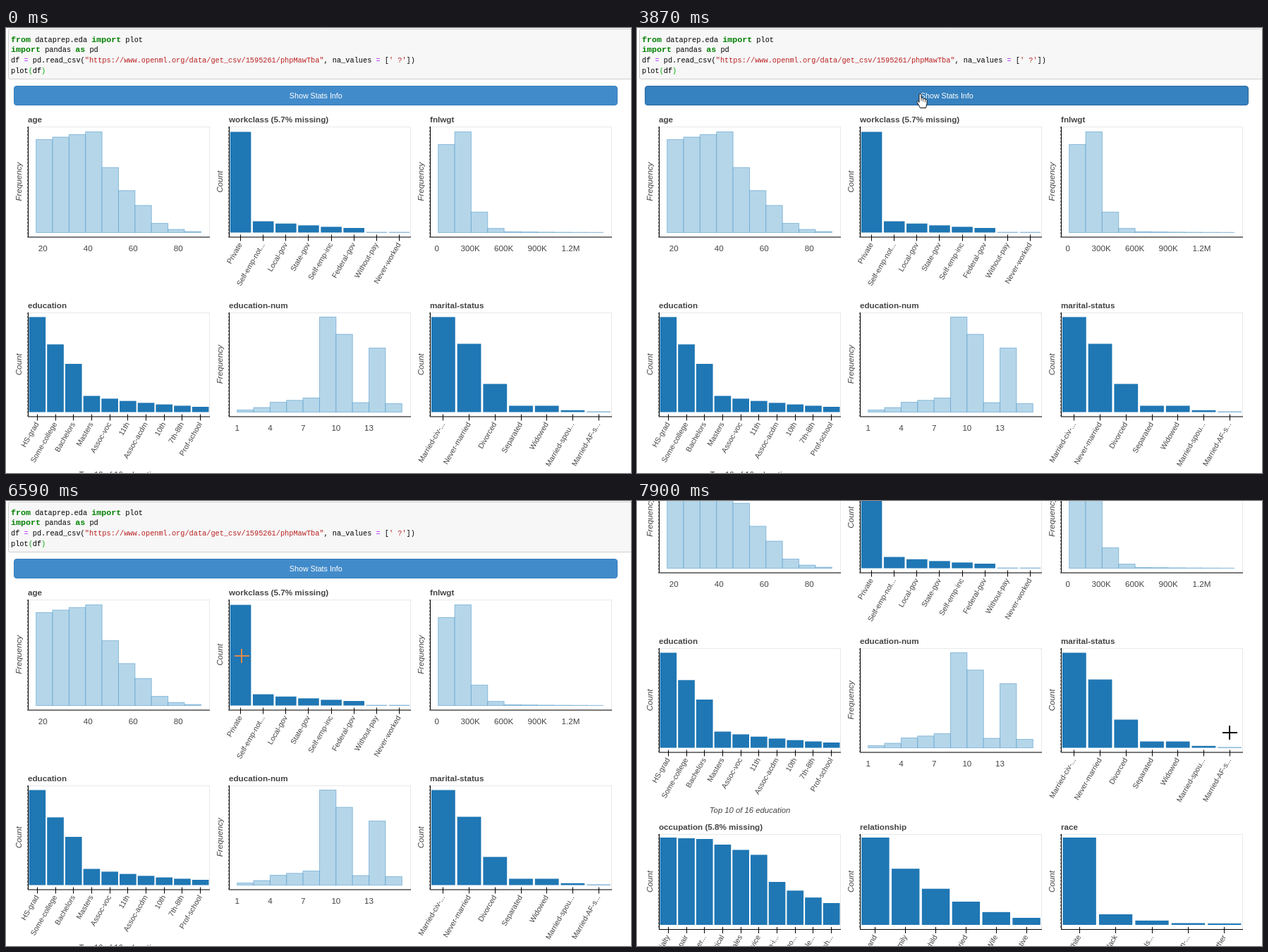
An HTML page with a canvas for the animation above (7990 ms loop, 886x632 px).

```html
<!DOCTYPE html>
<html lang="en">
<head>
<meta charset="utf-8">
<title>Dataset overview</title>
<style>
html, body { margin: 0; width: 100%; height: 100%; overflow: hidden; background: #fff; }
canvas { display: block; }
</style>
</head>
<body>
<canvas id="stage" width="886" height="632"></canvas>
<script>
const ctx = document.getElementById('stage').getContext('2d');
const LOOP = 7990;
const REFRESH = 78;
const SANS = '"Liberation Sans", Arial, sans-serif';
const MONO = '"Liberation Mono", monospace';
const INK = '#444';
const OPEN_AT = 2010, CLOSE_AT = 3870, STATS_HEIGHT = 255;
const PLOT_WIDTH = 257, PLOT_PITCH = 285, ROW_PITCH = 264;
const BINS = 10, BIN_PAD = 11.7, BIN_WIDTH = (PLOT_WIDTH - 2 * BIN_PAD) / BINS;
const PEOPLE = 48842, PEOPLE_PER_PIXEL = 9157 / 143;

// Each glide: first refresh, last refresh, destination
const POINTER_START = [947, 14];
const POINTER = [
  [850, 1550, 440, 95], [1780, 1860, 413, 86], [2010, 2010, 412, 88], [2160, 2240, 401, 89],
  [3030, 3030, 401, 84], [3720, 3720, 396, 84], [3870, 3870, 401, 94], [4180, 4800, 122, 197],
  [5740, 6130, 172, 252], [6280, 6590, 334, 220], [6670, 6980, 811, 335], [7840, 7900, 840, 329]
];
const SCROLL = [[7210, 7700, 127], [7840, 7900, 195]];

// Bar heights are given at a few bars and follow an exponential in between.
const PLOTS = [
  { title: 'age', bars: { 0: 132, 3: 143, 6: 38.5, 9: 1.5 }, range: [17, 90], ticks: [20, 20] },
  { title: 'workclass (5.7% missing)', bars: { 0: 143, 1: 16, 5: 6.5, 6: .7, 7: .7 },
    names: ['Private', 'Self-emp-not...', 'Local-gov', 'State-gov', 'Self-emp-inc', 'Federal-gov',
      'Without-pay', 'Never-worked'] },
  { title: 'fnlwgt', bars: { 0: 125, 1: 143, 4: 1.2, 9: .2 }, range: [12e3, 149e4], ticks: [0, 3e5] },
  { title: 'education', bars: { 0: 135, 2: 68.5, 3: 23, 9: 7.5 }, note: 'Top 10 of 16 education',
    names: ['HS-grad', 'Some-college', 'Bachelors', 'Masters', 'Assoc-voc', '11th', 'Assoc-acdm',
      '10th', '7th-8th', 'Prof-school'] },
  { title: 'education-num', bars: { 0: 3, 2: 14, 4: 20, 5: 135, 6: 110.5, 7: 13.5, 8: 91, 9: 12 },
    range: [1, 16], ticks: [1, 3] },
  { title: 'marital-status', bars: { 0: 135, 1: 97, 2: 40, 3: 9, 4: 9, 6: .8 },
    names: ['Married-civ-...', 'Never-married', 'Divorced', 'Separated', 'Widowed', 'Married-spou...',
      'Married-AF-s...'] },
  { title: 'occupation (5.8% missing)', bars: { 0: 124, 2: 122, 5: 99.5, 6: 61, 9: 31 },
    names: ['Prof-specialty', 'Craft-repair', 'Exec-manager...', 'Adm-clerical', 'Sales', 'Other-service',
      'Machine-op-i...', 'Transport-mo...', 'Handlers-cle...', 'Farming-fish...'] },
  { title: 'relationship', bars: { 0: 124, 3: 33, 5: 10 },
    names: ['Husband', 'Not-in-family', 'Own-child', 'Unmarried', 'Wife', 'Other-relative'] },
  { title: 'race', bars: { 0: 124, 1: 15, 3: 2.5, 4: 2 },
    names: ['White', 'Black', 'Asian-Pac-Is...', 'Amer-Indian-...', 'Other'] }
];
const ROW_DEPTHS = [156.5, 147.5, 135];

PLOTS.forEach((plot, i) => {
  const row = Math.floor(i / 3);
  plot.x = 31 + PLOT_PITCH * (i % 3);
  plot.top = 140 + ROW_PITCH * row;
  plot.axis = plot.top + ROW_DEPTHS[row];
  plot.base = plot.axis - 6;
  plot.heights = fillBetween(plot.bars);
});

const DATASET_STATS = [
  ['Number of Variables', '15'], ['Number of Observations', PEOPLE], ['Missing Cells', '6465'],
  ['Missing Cells (%)', '0.9%'], ['Duplicate Rows', '52'], ['Duplicate Rows (%)', '0.1%'],
  ['Total Size in Memory', '5.6 MB'], ['Average Record Size in Memory', '120.0 B']
];
const TYPE_STATS = [['Categorical', '9'], ['Numerical', '6']];

const KEYWORD = '#008000', OPERATOR = '#a2f', STRING = '#ba2121', BRACKET = '#0a0';
const CODE = [
  [['from', KEYWORD, 1], [' dataprep.eda '], ['import', KEYWORD, 1], [' plot']],
  [['import', KEYWORD, 1], [' pandas '], ['as', KEYWORD, 1], [' pd']],
  [['df '], ['=', OPERATOR], [' pd.read_csv('],
    ['"https://www.openml.org/data/get_csv/1595261/phpMawTba"', STRING],
    [', na_values '], ['=', OPERATOR], [' ['], ["' ?'", STRING], ['])']],
  [['plot'], ['(', BRACKET], ['df'], [')', BRACKET]]
];

function fillBetween(points) {
  const keys = Object.keys(points).map(Number);
  const heights = [points[0]];
  for (let k = 1; k < keys.length; k++) {
    const a = keys[k - 1], b = keys[k];
    for (let i = a + 1; i <= b; i++)
      heights.push(points[a] * (points[b] / points[a]) ** ((i - a) / (b - a)));
  }
  return heights;
}

// Position at time t, moving in refresh steps and slowing towards each destination.
function glide(start, moves, t) {
  let position = start;
  for (const [first, last, ...target] of moves) {
    if (t < first) break;
    const steps = Math.round((last - first) / REFRESH) + 1;
    const gap = (last - first) / Math.max(1, steps - 1) || REFRESH;
    const done = Math.min(steps, Math.floor((t - first + 5) / gap) + 1);
    const p = Math.sin(Math.PI / 2 * done / steps);
    position = position.map((v, i) => v + (target[i] - v) * p);
  }
  return position.map(Math.round);
}

function text(str, x, y, size, { color = INK, style = '', align = 'left', baseline = 'alphabetic', family = SANS } = {}) {
  ctx.font = `${style} ${size}px ${family}`;
  ctx.fillStyle = color;
  ctx.textAlign = align;
  ctx.textBaseline = baseline;
  ctx.fillText(str, x, y);
}

function turnedText(str, x, y, angle, size, options) {
  ctx.save();
  ctx.translate(x, y);
  ctx.rotate(angle);
  text(str, 0, 0, size, options);
  ctx.restore();
}

function rect(x, y, w, h, color) {
  ctx.fillStyle = color;
  ctx.fillRect(x, y, w, h);
}

function paint(fill, stroke) {
  ctx.fillStyle = fill;
  ctx.fill();
  ctx.strokeStyle = stroke;
  ctx.lineWidth = 1;
  ctx.stroke();
}

function roundBox(x, y, w, h, r, fill, stroke) {
  ctx.beginPath();
  ctx.roundRect(x, y, w, h, r);
  paint(fill, stroke);
}

function polygon(points, fill, stroke) {
  ctx.beginPath();
  points.forEach(([x, y]) => ctx.lineTo(x, y));
  ctx.closePath();
  paint(fill, stroke);
}

function drawCode() {
  roundBox(3.5, 1.5, 900, 71, 2, '#f7f7f7', '#cfcfcf');
  CODE.forEach((line, row) => {
    let x = 7;
    for (const [str, color = '#000', bold] of line) {
      text(str, x, 19.5 + 14.8 * row, bold ? 11.67 : 10.27, { color, style: bold ? 'bold' : '', family: MONO });
      x += ctx.measureText(str).width;
    }
  });
}

function drawButton(label, hover) {
  roundBox(11.5, 82.5, 855, 27, 3.5, hover ? '#3681bf' : '#428bca', hover ? '#2b699f' : '#357ebd');
  text(label, 439.3, 99.5, 10.7, { color: '#fff', align: 'center' });
}

function drawTable(title, x, width, valueX, rows) {
  text(title, x + width / 2, 142, 14.7, { color: '#000', style: 'bold', align: 'center' });
  rows.forEach(([name, value], i) => {
    const line = Math.round(177.9 + 23.75 * i);
    if (i % 2 === 0) rect(x, line - 23, width, 23, '#f5f5f5');
    rect(x, line, width, 1, '#111');
    text(name, x + 6, line - 8, 10.5, { color: '#000', style: 'bold' });
    text(value, valueX, line - 8, 10.5, { color: '#000' });
  });
}

function shortNumber(v) {
  return v >= 1e6 ? v / 1e6 + 'M' : v >= 1e3 ? v / 1e3 + 'K' : String(v);
}

function drawHistogram({ x, heights, base, axis, range: [low, high], ticks: [first, step] }) {
  const start = x + BIN_PAD;
  ctx.strokeStyle = 'rgba(75, 150, 198, .55)';
  ctx.lineWidth = 1;
  heights.forEach((h, i) => {
    rect(start + i * BIN_WIDTH, base - h, BIN_WIDTH, h, '#b5d6e9');
    ctx.strokeRect(start + i * BIN_WIDTH, base - h, BIN_WIDTH, h);
  });
  for (let v = first; v < high; v += step) {
    const tickX = start + (v - low) / (high - low) * BIN_WIDTH * BINS;
    text(shortNumber(v), tickX, axis + 20.3, 11.67, { align: 'center' });
  }
}

function drawCategories({ x, heights, base, axis, names }) {
  const step = PLOT_WIDTH / heights.length;
  heights.forEach((h, i) => {
    const center = x + .5 + step * (i + .5);
    rect(center - step * .46, base - h, step * .92, h, '#1f77b4');
    rect(Math.round(center - .5), axis - 3, 1, 9, '#000');
    turnedText(names[i], center, axis + 9.5, -Math.PI / 3, 10.5, { align: 'right', baseline: 'middle' });
  });
}

function drawPlot(plot) {
  const { x, top, axis, title, names, note } = plot;
  text(title, x, top - 6.5, 11.67, { style: 'bold' });
  ctx.strokeStyle = '#e8e8e8';
  ctx.lineWidth = 1;
  ctx.strokeRect(x + .5, top + .5, PLOT_WIDTH, axis - top);
  (names ? drawCategories : drawHistogram)(plot);
  rect(x, axis, PLOT_WIDTH + 1, 1, '#000');
  rect(x, top, 1, axis - top, '#000');
  for (let y = top; y < axis; y += 5) rect(x - 1, y, 1, 3, 'rgba(0, 0, 0, .4)');
  turnedText(names ? 'Count' : 'Frequency', x - 9, (top + axis) / 2, -Math.PI / 2, 11.67,
    { style: 'italic', align: 'center' });
  if (note) text(note, x + 129, axis + 86.5, 11.3, { style: 'italic', align: 'center' });
}

function drawHint({ x, base, heights, range: [low, high] }, index) {
  const center = x + BIN_PAD + BIN_WIDTH * (index + .5);
  const y = base - heights[index] / 2 - .5;
  const side = center < x + PLOT_WIDTH / 2 ? 1 : -1;
  const left = Math.round(side > 0 ? center + 11 : center - 133);
  const edge = center + side * 11;
  const limit = i => (low + (high - low) / BINS * i).toFixed(1);
  const people = Math.round(heights[index] * PEOPLE_PER_PIXEL);
  const lines = [
    ['Bin:', `[${limit(index)}, ${limit(index + 1)})`],
    ['Frequency:', people],
    ['Percent:', (people / PEOPLE * 100).toFixed(2) + '%']
  ];
  roundBox(left + .5, Math.round(y) - 30.5, 122, 61, 2, '#fff', '#e5e5e5');
  polygon([[edge - side * 8, y], [edge, y - 5], [edge, y + 5]], '#969696', '#969696');
  lines.forEach(([label, value], i) => {
    const baseline = y - 13.5 + 16.8 * i;
    text(label, left + 59.5, baseline, 10.5, { color: '#26aae1', align: 'right' });
    text(value, left + 61.5, baseline, 10.5);
  });
}

function drawCross(x, y) {
  ctx.globalCompositeOperation = 'difference';
  rect(x - 10, y - 1, 21, 2, '#fff');
  rect(x - 1, y - 10, 2, 9, '#fff');
  rect(x - 1, y + 1, 2, 9, '#fff');
  ctx.globalCompositeOperation = 'source-over';
}

function drawArrow(x, y) {
  const shape = [[0, 0], [0, 14], [3, 11], [5.3, 16], [7.6, 15], [5.5, 10.3], [9.8, 10.3]];
  polygon(shape.map(([dx, dy]) => [x + dx + .5, y + dy + .5]), '#fff', '#222');
}

function drawHand(x, y) {
  ctx.save();
  ctx.translate(x - 5, y - .5);
  ctx.beginPath();
  ctx.moveTo(4, 12);
  ctx.lineTo(4, 1.5);
  ctx.arc(5.5, 1.5, 1.5, Math.PI, 0);
  ctx.lineTo(7, 6);
  for (let finger = 0; finger < 3; finger++)
    ctx.quadraticCurveTo(8.5 + finger * 2.7, 4.5 + finger, 9.7 + finger * 2.7, 7 + finger);
  ctx.lineTo(15, 14);
  ctx.lineTo(13.5, 20);
  ctx.lineTo(5.5, 20);
  ctx.lineTo(.5, 11);
  ctx.quadraticCurveTo(1.5, 8.5, 4, 12);
  paint('#fff', '#111');
  for (let gap = 0; gap < 3; gap++) rect(6.6 + gap * 2.7, 6 + gap, .8, 4, '#222');
  ctx.restore();
}

function render(t) {
  const open = t >= OPEN_AT && t < CLOSE_AT;
  const shift = open ? STATS_HEIGHT : 0;
  const [scroll] = glide([0], SCROLL, t);
  const [x, y] = glide(POINTER_START, POINTER, t);
  const pageY = y + scroll;
  const visible = t >= POINTER[0][0];
  const onButton = visible && x > 11 && x < 867 && pageY > 82 && pageY < 110;
  const onPlot = PLOTS.some(p => x >= p.x && x <= p.x + PLOT_WIDTH
    && pageY - shift >= p.top && pageY - shift <= p.axis);

  rect(0, 0, 886, 632, '#fff');
  ctx.save();
  ctx.translate(0, -scroll);
  drawCode();
  drawButton(open ? 'Hide Stats Info' : 'Show Stats Info', onButton);
  if (open) {
    drawTable('Dataset Statistics', 11, 423, 347, DATASET_STATS);
    drawTable('Variable Types', 439, 422, 783, TYPE_STATS);
  }
  ctx.translate(0, shift);
  PLOTS.forEach(drawPlot);
  const age = PLOTS[0];
  const bin = Math.floor((x - age.x - BIN_PAD) / BIN_WIDTH);
  if (pageY > age.base - age.heights[bin] && pageY < age.base) drawHint(age, bin);
  ctx.restore();

  if (visible) (onButton ? drawHand : onPlot ? drawCross : drawArrow)(x, y);
}

let begin;
function loop(now) {
  begin ??= now;
  render((now - begin) % LOOP);
  requestAnimationFrame(loop);
}
requestAnimationFrame(loop);
</script>
</body>
</html>
```
